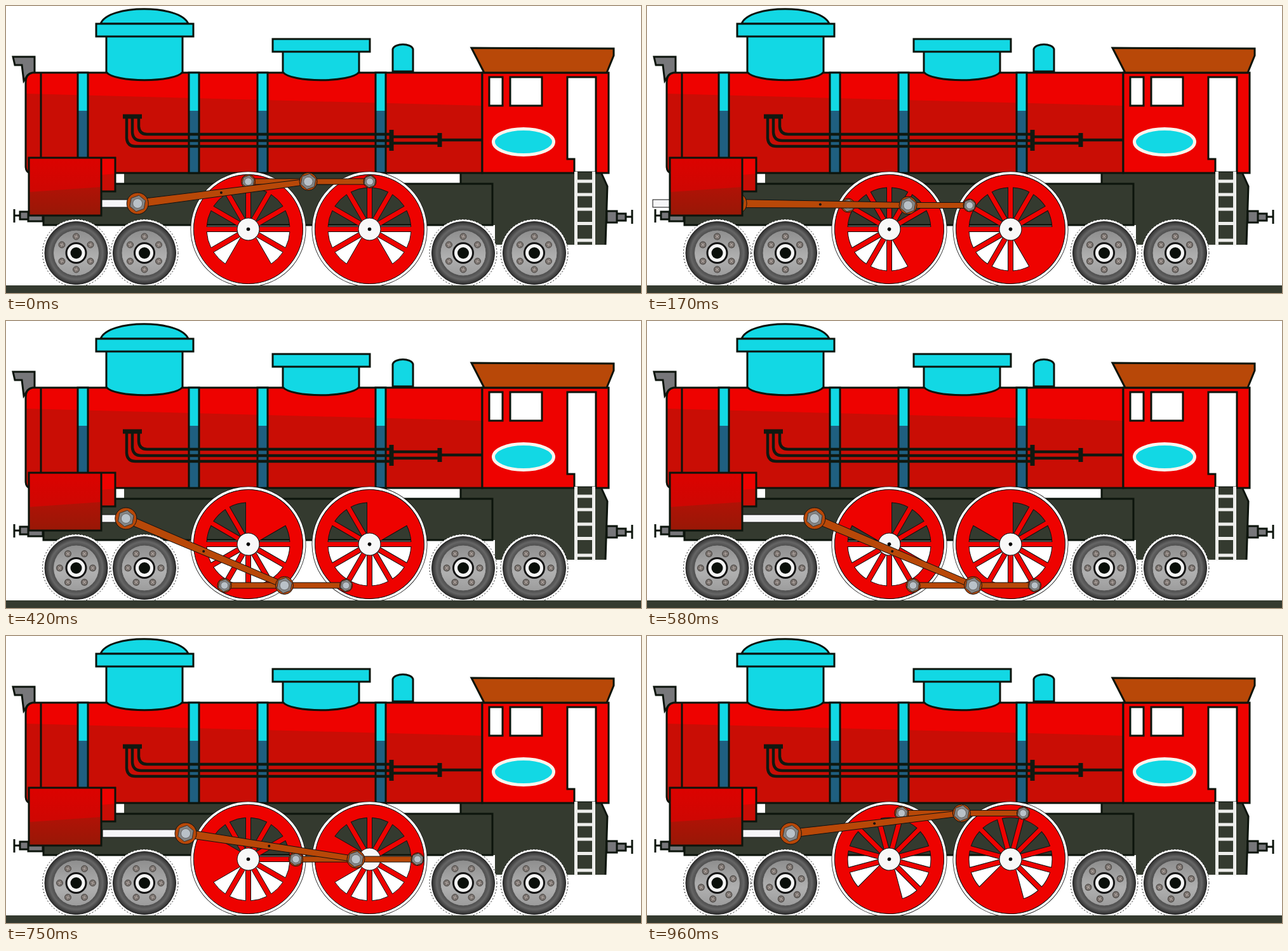
An HTML page that plays this animation: 1000x452 px, repeating every 1 s.

```html
<!DOCTYPE html>
<html lang="en">
<head>
<meta charset="utf-8">
<title>Steam locomotive</title>
<style>
  html, body { margin: 0; height: 100%; overflow: hidden; background: #fff; }
  svg { display: block; width: 100%; height: 100%; }
  .line { stroke: #0c140c; stroke-width: 3; }
  .thin { stroke: #111; stroke-width: 1; }
  .red { fill: #ee0200; }
  .shade { fill: #c90d05; }
  .cyan { fill: #12d8e4; }
  .brown { fill: #b84808; }
  .dark { fill: #343a2f; }
  .grey { fill: #77777a; }
  .white { fill: #fff; }
  .pipe { fill: none; stroke: #101810; stroke-width: 4.5; }
</style>
</head>
<body>
<svg id="stage" viewBox="0 0 1000 452">
  <defs>
    <radialGradient id="tyre">
      <stop offset=".7" stop-color="#4a4a4a"/>
      <stop offset=".84" stop-color="#666"/>
      <stop offset="1" stop-color="#2b2b2b"/>
    </radialGradient>
    <linearGradient id="rim" x2="0" y2="1">
      <stop stop-color="#8e8e8e"/>
      <stop offset=".6" stop-color="#b0b0b0"/>
      <stop offset="1" stop-color="#9c9c9c"/>
    </linearGradient>
    <linearGradient id="drum" x2="0" y2="1">
      <stop stop-color="#dc0200"/>
      <stop offset="1" stop-color="#c40a04"/>
    </linearGradient>
    <linearGradient id="drumLow" x2="0" y2="1">
      <stop stop-color="#b01206"/>
      <stop offset="1" stop-color="#981806"/>
    </linearGradient>
  </defs>

  <g id="chassis">
    <path class="dark" d="M186 263H600V282H186Z"/>
    <path class="dark" d="M716 263H938L948 284L944 376H770V345H716Z"/>
    <path class="dark line" d="M59 280H766V345H59Z"/>
    <path class="line" d="M716 263V280M938 264L947 284L944 376" fill="none"/>
    <g class="grey line" stroke-width="2">
      <path d="M13 320V341M13 330H22" fill="none"/>
      <path d="M35 326H58V339H35ZM22 324H35V336H22Z"/>
      <path d="M986 321V343M976 332H986" fill="none"/>
      <path d="M946 323H962V341H946ZM962 327H976V338H962Z"/>
    </g>
  </g>

  <g id="boiler">
    <path class="grey line" d="M11 80H45V106L34 109L28 118L25 93H14Z"/>
    <path class="red" d="M42 105H750V264H38Q30 262 30 252V120Q31 107 42 105Z"/>
    <path class="shade" d="M30 138L750 157V264H38Q30 262 30 252Z"/>
    <path class="line" fill="none" d="M42 105H750V263H38Q31 262 31 252V120Q31 107 42 105ZM55 105V263"/>
    <g id="bands"></g>
    <g class="cyan line">
      <path d="M149 28C160 -3 275 -3 287 28Z"/>
      <path d="M158 48V104C170 121 266 121 278 104V48ZM142 28H295V48H142Z"/>
      <path d="M436 72V104C448 121 544 121 556 104V72ZM420 52H573V72H420Z"/>
      <path d="M609 103V68C612 58 638 58 641 68V103Z"/>
    </g>
    <g class="pipe">
      <path d="M190 176V208Q191 221 204 221H605"/>
      <path d="M199 176V199Q200 212 213 212H605"/>
      <path d="M209 176V190Q210 202 222 202H605"/>
      <path d="M610 206H682M610 216H682M684 211H750"/>
      <path d="M184 174H214M607 195V228M683 200V222" stroke-width="7"/>
    </g>
  </g>

  <g id="cab">
    <path class="red line" d="M750 105H949V263H750Z"/>
    <path class="brown line" d="M733 66L957 67V78L946 105H753Z"/>
    <path class="white line" d="M761 112H782V157H761ZM794 112H844V157H794ZM884 112H929V262H895V241H884Z"/>
    <ellipse class="cyan" cx="815" cy="214" rx="47.5" ry="20.5" stroke="#fbf5ee" stroke-width="5"/>
    <path d="M895 262H928V376H895Z" class="dark"/>
    <path d="M897.500 261V377M925.500 261V377M897 276H926M897 297H926M897 320H926M897 342.500H926M897 369H926" stroke="#eeeeec" stroke-width="5"/>
  </g>

  <rect id="piston" class="thin" y="305" height="12" width="140" fill="#f6f6f8"/>
  <g id="wheels"></g>
  <path class="dark" d="M0 440H1000V452H0Z"/>
  <g id="coupling"></g>
  <g id="rod">
    <path id="rodBar" class="brown thin"/>
    <circle id="rodDot" r="2" fill="#111"/>
    <g id="crosshead"></g>
    <g id="bigEnd"></g>
  </g>

  <g id="cylinder">
    <path class="red" d="M150 239H173V292H150Z"/>
    <path class="shade" d="M150 266L173 264V292H150Z"/>
    <path fill="url(#drum)" d="M36 239H150V330H36Z"/>
    <path fill="url(#drumLow)" d="M36 293L150 285V330H36Z"/>
    <path class="line" fill="none" d="M36 239H150V330H36ZM150 239H172V292H150"/>
  </g>
</svg>
<script>
const $ = id => document.getElementById(id);
const range = (n, f) => Array.from({ length: n }, (_, i) => f(i)).join('');
const polar = (r, deg) => {
  const a = deg * Math.PI / 180;
  return [r * Math.cos(a), -r * Math.sin(a)];
};
const at = (r, deg) => polar(r, deg).map(v => v.toFixed(2)).join(' ');
const circle = (r, attrs) => `<circle r="${r}" ${attrs}/>`;

const STEPS = 24, CRANK = 75, ROD = 271, AXLE_Y = 351.5, PISTON_Y = 311;
const DRIVERS = [381.5, 572.5], CARRIERS = [110.5, 218, 720, 832];
const BIG_END = 94.5;

// Ten openings between twelve spokes; the two at the bottom are the counterweight.
function driver() {
  const openings = range(10, i => {
    const a = 300 + i * 30;
    return `M${at(15.5, a + 15)}L${at(65.5, a + 3.5)}A65.5 65.5 0 0 0 ${at(65.5, a + 26.5)}Z`;
  });
  return circle(88.5, 'fill="none" stroke="#111" stroke-width="5"') +
    circle(88.2, 'fill="none" stroke="#fff" stroke-width="4"') +
    `<path class="red thin" fill-rule="evenodd" d="M86 0A86 86 0 1 0 -86 0A86 86 0 1 0 86 0Z${openings}"/>` +
    circle(17.5, 'class="thin" fill="#f8f8f8"') + circle(2.8, 'fill="#000"');
}

function carrier() {
  const bolts = range(6, i => `<g transform="translate(${at(26, 90 + i * 60)})">` +
    circle(5, 'fill="#77706c" stroke="#4c4845"') +
    '<path d="M-3 -1L3 1M1 -3L-1 3" stroke="#b5aaa5"/></g>');
  return `<g class="spin">${bolts}</g>` +
    circle(15.5, 'fill="#f4f4f4" stroke="#151515" stroke-width="3"') +
    circle(9, 'fill="#0a0f0a"');
}

const carrierBase = circle(53, 'class="thin white" stroke-dasharray="2 3"') +
  circle(49.5, 'fill="url(#tyre)" stroke="#222"') +
  circle(36, 'fill="url(#rim)" stroke="#555"');

const nut = (r, plate) => circle(plate, 'class="brown thin"') +
  `<path d="M${range(6, i => (i ? 'L' : '') + at(r, 20 + i * 60))}Z" fill="#858585" stroke="#333"/>` +
  circle(r * .58, 'fill="#b9c1c8" stroke="#666"');

const place = (x, y, body) => `<g transform="translate(${x} ${y})">${body}</g>`;

$('bands').innerHTML = [113, 288, 396, 582].map(x =>
  `<path class="cyan" d="M${x} 105h16v60h-16z"/><path fill="#1f5f80" d="M${x} 165h16v98h-16z"/>` +
  `<path class="line" fill="none" d="M${x} 105h16v158h-16z"/>`).join('');
$('wheels').innerHTML =
  CARRIERS.map(x => place(x, 389, carrierBase + carrier())).join('') +
  DRIVERS.map(x => place(x, AXLE_Y, `<g class="spin">${driver()}</g>`)).join('');
$('coupling').innerHTML = '<path class="brown thin" d="M0 -4.500H191.500V4.500H0Z"/>' +
  place(0, 0, nut(10, 11)) + place(191.5, 0, nut(9.5, 10));
$('crosshead').innerHTML = nut(13, 17);
$('bigEnd').innerHTML = nut(12.5, 14);
const spinners = document.querySelectorAll('.spin');

const move = (id, x, y) => $(id).setAttribute('transform', `translate(${x} ${y})`);

function pose(angle) {
  const [dx, dy] = polar(CRANK, 90 + angle);
  const pinX = DRIVERS[0] + dx, pinY = AXLE_Y + dy;
  const endX = pinX + BIG_END, rise = pinY - PISTON_Y;
  const run = Math.sqrt(ROD * ROD - rise * rise);
  const headX = endX - run;
  const nx = -rise / ROD, ny = run / ROD;
  const edge = (x, y, w) => `${x + nx * w} ${y + ny * w}`;

  spinners.forEach(s => s.setAttribute('transform', `rotate(${-angle})`));
  move('coupling', pinX, pinY);
  move('crosshead', headX, PISTON_Y);
  move('bigEnd', endX, pinY);
  move('rodDot', headX + run * .49, PISTON_Y + rise * .49);
  $('rodBar').setAttribute('d', `M${edge(headX, PISTON_Y, -6.5)}L${edge(endX, pinY, -4.5)}` +
    `L${edge(endX, pinY, 4.5)}L${edge(headX, PISTON_Y, 6.5)}Z`);
  $('piston').setAttribute('x', headX - 131);
}

// The motion runs in 24 poses a second, each starting on a whole hundredth.
function frame() {
  const t = Math.floor(performance.now() % 1000 / 10) * 10;
  pose(Math.floor((t + 4.9) * STEPS / 1000) * 360 / STEPS);
  requestAnimationFrame(frame);
}
frame();
</script>
</body>
</html>
```
